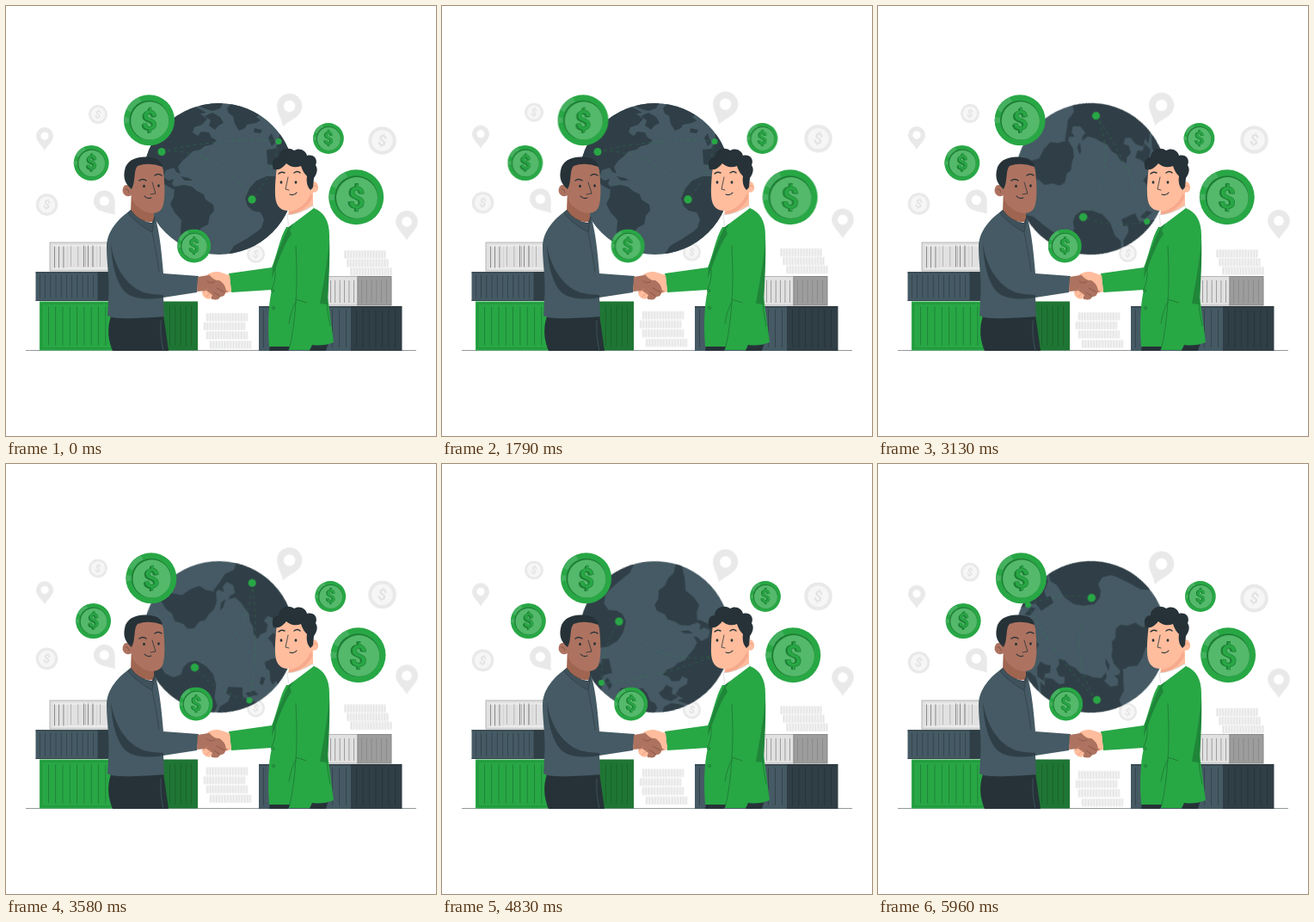
Animation of 500x500 px, one loop 6 s. Source, as an HTML page:

```html
<!DOCTYPE html>
<html lang="en">
<head>
<meta charset="utf-8">
<title>Global trade handshake</title>
<style>
  html, body { margin: 0; width: 100%; height: 100%; overflow: hidden; background: #fff; }
  svg { display: block; width: 100%; height: 100%; }
  text { font: 700 35px Roboto, Arial, sans-serif; text-anchor: middle; }
  .line { fill: none; stroke-linecap: round; stroke-linejoin: round; }
  .float { animation: float 1.5s linear infinite; }
  .shake { animation: shake 6s linear infinite; }
  .spin { animation: spin 6s linear infinite; transform-origin: 247.5px 201px; }
  @keyframes float { 50% { transform: translateY(-6px); } }
  @keyframes shake {
    0%, 100% { transform: none; }
    10%, 90% { transform: translateX(-.6px); }
    20%, 80% { transform: translateX(1.2px); }
    30%, 50%, 70% { transform: translateX(-2.5px); }
    40%, 60% { transform: translateX(2.5px); }
  }
  @keyframes spin {
    0%, 32.92% { transform: rotate(0deg); }
    100% { transform: rotate(241.5deg); }
  }
</style>
</head>
<body>
<svg viewBox="0 0 500 500">
  <defs>
    <!-- coins are drawn with radius 32 around the origin -->
    <g id="coin">
      <circle r="32" fill="#28a745"/>
      <path d="M-29-13A32 32 0 0 1-13-29L-10-23A25 25 0 0 0-23-10ZM-31.5 4A32 32 0 0 1-31.5-4L-25-3V3Z" fill="#45b060"/>
      <circle r="25" fill="#1d7c34"/>
      <circle cx=".8" cy=".8" r="24" fill="#54b96b"/>
      <text x="-1.2" y="13" fill="#1d7c34">$</text>
      <text x=".6" y="12.300" fill="#28a745" stroke="#1d7c34" stroke-width=".6">$</text>
    </g>
    <g id="pale">
      <circle r="32" fill="#e9e9e9"/>
      <circle r="24" fill="#f6f6f6"/>
      <text transform="rotate(12)" y="12" fill="#e3e3e3">$</text>
    </g>
    <!-- pins have their tip at the origin -->
    <path id="pin" d="M0 0C-3-6-10-10-10-17A10 10 0 0 1 10-17C10-10 3-6 0 0ZM0-21.5A4.6 4.6 0 1 0 0-12.3A4.6 4.6 0 1 0 0-21.5Z" fill="#e9e9e9"/>
    <g id="row">
      <rect width="49" height="9.8" rx="1" fill="#f1f1f1"/>
      <path d="M1 4.9H48" stroke="#e1e1e1" stroke-width="8" stroke-dasharray="1 2.3"/>
    </g>
    <clipPath id="disc"><circle cx="247.5" cy="201" r="88"/></clipPath>
  </defs>

  <g class="float">
    <use href="#pin" transform="translate(45 168)"/>
    <use href="#pin" transform="translate(466 272.500) scale(1.28)"/>
    <use href="#pin" transform="translate(322 140) rotate(18) scale(1.46)"/>
    <use href="#pin" transform="translate(127 243) rotate(-38) scale(1.22)"/>
    <use href="#pale" transform="translate(107 126) scale(.34)"/>
    <use href="#pale" transform="translate(47.500 231) scale(.4)"/>
    <use href="#pale" transform="translate(437.500 156.500) scale(.51)"/>
    <use href="#pale" transform="translate(290.500 288.500) scale(.33)"/>
  </g>

  <g class="spin">
    <circle cx="247.500" cy="201" r="88" fill="#455a64"/>
    <g clip-path="url(#disc)" fill="#303f47">
      <path d="M155 190L158 160 178 140 190 128 206 121 224 124 234 131 228 138 219 141 217 147 223 151 227 146 236 147 239 153 245 156 240 161 231 163 226 167 217 169 211 175 205 180 200 187 203 195 198 193 195 188 186 191 183 199 189 203 195 201 193 207 198 212 194 213 184 207 174 202 168 192Z"/>
      <path d="M207 123L216 116 224 119 233 124 222 126ZM222 115L236 111 253 112 249 119 240 122 230 119ZM231 128L240 124 249 129 253 136 247 139 243 144 236 139 238 133ZM203 198L213 200 217 203 208 203Z"/>
      <path d="M257 119L265 110 284 113 297 125 291 129 296 133 291 136 280 138 278 142 271 145 266 137 264 128 259 125Z"/>
      <path d="M289 142L298 144 296 148 288 147ZM305 153L309 148 313 159 309 163ZM303 167L313 166 317 159 318 148 326 139 340 148V194L328 191 321 182 314 180 312 185 304 184Z"/>
      <path d="M196 210L207 208 216 210 222 215 230 219 232 225 241 231 242 238 237 244 235 254 227 258 222 266 215 271 212 278 209 285 204 280 203 263 204 249 196 240 191 230 195 222Z"/>
      <path d="M283 212L291 203 303 198 319 198 327 194 342 198V290H258L265 279 279 271 291 263 297 258 300 248 296 240 287 238 281 233 278 224Z"/>
    </g>
    <g class="line" stroke="#28a745" stroke-width=".6" stroke-dasharray="2.500 5" opacity=".45">
      <path d="M181 169Q250 153 317 157M181 169Q247 165 286 225M317 157Q311 198 286 225"/>
    </g>
    <g fill="#28a745">
      <circle cx="181" cy="169.500" r="4.500"/>
      <circle cx="317" cy="157.500" r="3.500"/>
      <circle cx="286" cy="225" r="4.700"/>
    </g>
  </g>

  <g class="float">
    <use href="#row" x="232.500" y="357"/>
    <use href="#row" x="229.500" y="367.500"/>
    <use href="#row" x="232.500" y="378"/>
    <use href="#row" x="236.500" y="389"/>
    <use href="#row" x="393" y="284"/>
    <use href="#row" x="396" y="294"/>
    <use href="#row" x="400" y="304"/>
  </g>

  <!-- containers -->
  <path d="M23 400.500H477" stroke="#263238" stroke-width=".5"/>
  <rect x="51" y="275" width="90" height="33" fill="#e1e1e1" stroke="#b4b4b4"/>
  <path d="M55 279H130M55 305H130" stroke="#f5f5f5"/>
  <path d="M56 292H72M90 291H106" stroke="#666" stroke-width="25" stroke-dasharray=".7 4.600"/>
  <path d="M75 291H118" stroke="#999" stroke-width="24" stroke-dasharray=".6 8"/>
  <rect x="34.500" y="309" width="73" height="34" fill="#455a64"/>
  <rect x="106.500" y="309" width="48" height="34" fill="#303f46"/>
  <path d="M39 326H105" stroke="#303f46" stroke-width="27" stroke-dasharray=".8 5.400"/>
  <path d="M34.500 310H150M34.500 342.500H150" stroke="#303f46" stroke-width=".8"/>
  <rect x="39" y="343.500" width="127" height="57" fill="#28a745"/>
  <rect x="166" y="343.500" width="57" height="57" fill="#1f7634"/>
  <path d="M41.500 346H164V398H41.500Z" fill="none" stroke="#1f8639" stroke-width=".8"/>
  <path d="M49 372H160" stroke="#1d7c34" stroke-width="45" stroke-dasharray=".8 7.500"/>
  <path d="M190 372H220" stroke="#185f29" stroke-width="47" stroke-dasharray=".8 5.500"/>
  <rect x="294" y="349" width="107" height="52" fill="#455a64"/>
  <rect x="401" y="349" width="59.500" height="52" fill="#303e45"/>
  <path d="M299 375H398" stroke="#303f46" stroke-width="44" stroke-dasharray=".8 7.200"/>
  <path d="M407 375H456" stroke="#253138" stroke-width="44" stroke-dasharray=".8 6.700"/>
  <path d="M294 350H460" stroke="#263238" stroke-width=".8"/>
  <rect x="360" y="314.500" width="49" height="33.500" fill="#e1e1e1" stroke="#b4b4b4"/>
  <rect x="409" y="314.500" width="39" height="33.500" fill="#9d9d9d" stroke="#858585"/>
  <path d="M377 332H406" stroke="#808080" stroke-width="26" stroke-dasharray=".7 4.700"/>
  <path d="M413 332H446" stroke="#868686" stroke-width="27" stroke-dasharray=".8 5"/>

  <g class="shake">
    <use href="#coin" transform="translate(166.500 132.700) scale(.922)"/>
    <use href="#coin" transform="translate(99.200 182.500) scale(.64)"/>
    <use href="#coin" transform="translate(374.900 154) scale(.56)"/>
    <use href="#coin" transform="translate(407.200 222.300)"/>
    <use href="#coin" transform="translate(218.600 279) scale(.61)"/>
  </g>

  <!-- man in grey -->
  <path d="M122 361C117 375 119 390 124 401H189L183 359Z" fill="#263238"/>
  <path d="M180 366Q179 385 183 401" class="line" stroke="#455a64" stroke-width=".8"/>
  <path d="M146 212L145 239C150 247 161 252 172 251L172 236Z" fill="#a06550"/>
  <path d="M144 238C131 247 117 262 117 280C117 301 121 318 119 342L118 360Q124 364 150 363T184 361L183 339 222 333 224 314 183 311C181 288 179 264 173 244L170 252C161 252 151 247 144 238Z" fill="#455a64"/>
  <path d="M122 277C126 304 140 325 160 333Q171 336 183 336V339C165 342 148 341 139 333C128 322 123 300 122 277Z" fill="#303f47"/>
  <path d="M145 237L142 241Q154 255 170 263L173 245 170 253Q152 249 145 237Z" fill="#3f525c" stroke="#263238" stroke-width=".5"/>
  <path d="M170 263Q175 287 178 309" class="line" stroke="#303f47" stroke-width=".7"/>
  <path d="M146 193C149 184 161 181 173 182Q182 183 183 191C185 212 185 226 182 234C178 243 164 243 155 235Q147 230 146 220C139 224 134 217 136 212C137 207 143 207 146 211Z" fill="#ad7360"/>
  <path d="M146 213C139 207 136 201 138 191C140 179 153 174 167 176C177 177 181 181 182 187Q166 181 153 186C148 191 151 204 146 213Z" fill="#263238"/>
  <g class="line" stroke="#263238" stroke-width="1.100">
    <path d="M155 203Q159 200 163 203M173 197Q177 194 181 197" stroke-width="1.400"/>
    <path d="M170 205L174 218 168 219" stroke-width=".8"/>
    <path d="M161 221Q164 225 169 223"/>
    <path d="M139 213Q142 212 143 217" stroke="#7d4d3e" stroke-width=".8"/>
  </g>
  <g fill="#263238">
    <ellipse cx="160.500" cy="209.500" rx="1.400" ry="1.800"/>
    <ellipse cx="177.500" cy="209" rx="1.400" ry="1.800"/>
  </g>

  <!-- man in green -->
  <path d="M307 394L306 401H328L331 394ZM357 391L353 401H372L375 391Z" fill="#263238"/>
  <path d="M328 240L326 257 334 262 357 241 356 229Z" fill="#fafafa"/>
  <path d="M330 225L328 246Q346 245 357 233V212Z" fill="#ffbd9d"/>
  <path d="M329 239Q346 237 355 217L356 224Q347 240 329 243Z" fill="#f6a98c"/>
  <path d="M327 243Q342 242 357 232L358 238 340 249 329 257Z" fill="#fff" stroke="#cfcfcf" stroke-width=".6"/>
  <path d="M358 235C370 240 376 250 376 267C376 290 375 318 374 338L381 391Q369 396 356 394L353 400H329L330 396 306 396C304 370 305 348 309 330L262 333 259 311 309 304C315 290 318 270 326 257L329 257Z" fill="#28a745"/>
  <path d="M376 270C374 300 368 328 365 346L374 347C375 320 377 296 376 270Z" fill="#1f8639"/>
  <path d="M334 253L329 257C322 270 315 288 310 305L309 317C315 301 322 279 332 265L330 260Z" fill="#1f8639"/>
  <g class="line" stroke="#1d7631" stroke-width=".8">
    <path d="M337 279Q339 318 337 344Q335 375 330 396M337 341L349 345M373 346Q374 358 377 372M337 344Q332 352 329 369M309 329Q314 319 313 306"/>
    <circle cx="311" cy="351" r="1.600"/>
    <circle cx="310" cy="331" r="1.600"/>
  </g>
  <path d="M315 187C313 202 312 219 314 227C317 238 326 240 336 236Q350 231 355 216C362 219 365 212 362 207C360 203 357 204 355 207L354 186 332 178Z" fill="#ffbd9d"/>
  <path d="M311 190C308 182 311 176 317 176C317 167 328 163 335 168C341 164 349 168 350 174C358 172 363 178 360 185C364 191 360 197 358 200L357 211 354 214C350 210 349 204 350 198Q345 193 343 186C336 189 329 186 326 183Q319 192 311 190Z" fill="#263238"/>
  <g class="line" stroke="#263238" stroke-width="1.100">
    <path d="M317 195Q320 192 324 194M335 194Q339 191 342 194" stroke-width="1.400"/>
    <path d="M328 199L325 213 329 214" stroke-width=".8"/>
    <path d="M330 219Q335 221 338 217"/>
    <path d="M357 210Q360 207 361 210" stroke="#de8e72" stroke-width=".8"/>
  </g>
  <g fill="#263238">
    <ellipse cx="320" cy="205" rx="1.400" ry="1.800"/>
    <ellipse cx="337" cy="205" rx="1.400" ry="1.800"/>
  </g>

  <!-- handshake -->
  <path d="M260 313L250 310Q241 308 234 312L237 318 231 328Q226 333 230 338Q235 343 240 339L262 332Z" fill="#ffbd9d"/>
  <path d="M223 315L235 313Q242 310 247 316L259 326Q261 332 255 333Q255 338 249 338Q247 343 241 341Q237 342 240 336L233 331 222 332Z" fill="#ad7360"/>
  <path d="M236 312Q243 307 250 310L260 314 262 332 256 331Q255 323 248 319Q242 320 236 312Z" fill="#ffbd9d"/>
  <g class="line" stroke="#7d4d3e" stroke-width=".7">
    <path d="M234 320Q239 324 243 320M245 328L254 333M242 333L249 338"/>
    <path d="M229 333L234 329M233 338L238 333" stroke="#de8e72"/>
  </g>
</svg>
</body>
</html>
```
